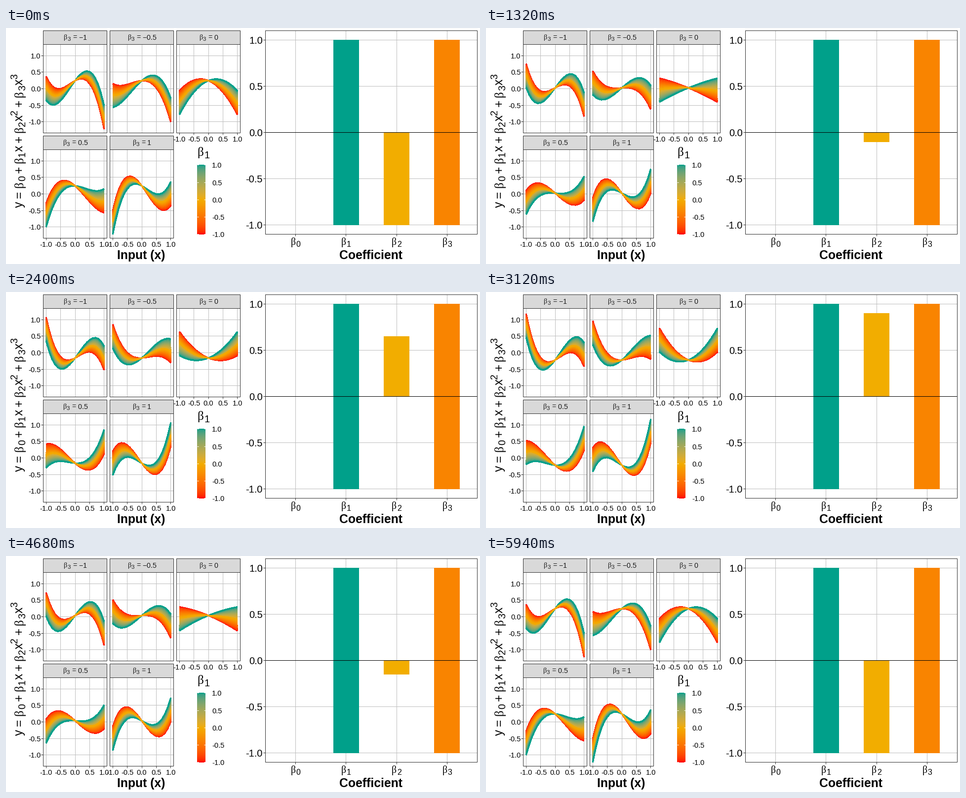
Animation of 960 by 480 pixels, one loop 6 s. Source, as a matplotlib script:

```python
import math
import numpy as np
import matplotlib.pyplot as plt
from matplotlib.animation import FuncAnimation
from matplotlib.collections import LineCollection
from matplotlib.colors import to_rgb
from matplotlib.patches import Rectangle

plt.rcParams["font.family"] = "Liberation Sans"

W, H, DPI = 960, 480, 96
PX = 72 / DPI  # points per pixel
TEAL, YELLOW, ORANGE, RED = "#00A08A", "#F2AD00", "#F98400", "#FF0000"
GRID, BORDER, STRIP = "#BEBEBE", "#333333", "#D9D9D9"
HALF, STEP = 50, 0.05  # frames per sweep, step between keyed beta_2 values

fig = plt.figure(figsize=(W / DPI, H / DPI), dpi=DPI, facecolor="white")
ax = fig.add_axes([0, 0, 1, 1])
ax.set_xlim(0, W)
ax.set_ylim(H, 0)
ax.axis("off")


def center(v):
    """Middle of the pixel that holds v."""
    return math.floor(v) + .5


def line(x0, y0, x1, y1, color=GRID, z=1):
    ax.plot([center(x0), center(x1)], [center(y0), center(y1)], color=color,
            lw=PX, zorder=z, solid_capstyle="butt", snap=False)


def frame(x0, y0, x1, y1, fill="none"):
    x0, y0, x1, y1 = map(center, (x0, y0, x1, y1))
    ax.add_patch(Rectangle((x0, y0), x1 - x0, y1 - y0, fc=fill, ec=BORDER,
                           lw=PX, zorder=4, snap=False, joinstyle="miter"))


def block(x0, y0, x1, y1, fill):
    patch = Rectangle((x0, y0), x1 - x0, y1 - y0, fc=fill, ec="none",
                      zorder=2, snap=False)
    return ax.add_patch(patch)


def label(x, y, text, size, ha="center", color="black", **kw):
    ax.text(x, y, text, size=size * PX, ha=ha, va="baseline", color=color,
            zorder=6, **kw)


# Font advances in em; digits and anything else use the default
ADVANCE = {"β": .549, "x": .5, "y": .5, "=": .584, "+": .584, "−": .584, ".": .278}
SPACE = {"=": .278, "+": .222}
SMALL = .8


def formula(x, y, text, size, align=.5, angle=0, color="black"):
    """Set a formula; '_' lowers and '^' raises the next character."""
    glyphs, pen, shift = [], 0, ""
    for ch in text:
        if ch in "_^":
            shift = ch
            continue
        scale = SMALL if shift else 1
        rise = {"_": -.2, "^": .45, "": 0}[shift]
        pen += SPACE.get(ch, 0)
        glyphs.append((ch, pen, rise, scale))
        pen += ADVANCE.get(ch, .556) * scale + SPACE.get(ch, 0)
        shift = ""
    c, s = math.cos(math.radians(angle)), math.sin(math.radians(angle))
    for ch, at, rise, scale in glyphs:
        dx, dy = (at - align * pen) * size, rise * size
        label(x + dx * c - dy * s, y - dx * s - dy * c, ch, size * scale, "left",
              color, rotation=angle, rotation_mode="anchor",
              family="Liberation Serif" if ch == "β" else "Liberation Sans")


# Colour scale: red, yellow, teal blended in CIE Lab
XYZ = np.array([[.4124, .3576, .1805], [.2126, .7152, .0722], [.0193, .1192, .9505]])


def blend(t):
    stops = np.array([to_rgb(c) for c in (RED, YELLOW, TEAL)])
    lin = np.where(stops > .04045, ((stops + .055) / 1.055) ** 2.4, stops / 12.92)
    lab = np.cbrt(lin @ XYZ.T)
    mix = np.stack([np.interp(t, [-1, 0, 1], c) for c in lab.T], axis=-1)
    rgb = np.clip(mix ** 3 @ np.linalg.inv(XYZ).T, 0, 1)
    return np.where(rgb > .0031308, 1.055 * rgb ** (1 / 2.4) - .055, 12.92 * rgb)


# Orthonormal polynomials on the 21 point grid
xs = np.linspace(-1, 1, 21)
s2, s4 = np.sum(xs ** 2), np.sum(xs ** 4)
P1, P2, P3 = [p / np.linalg.norm(p)
              for p in (xs, xs ** 2 - s2 / 21, xs ** 3 - s4 / s2 * xs)]

# Stacking order: 0 up to 1, then -1 up to 0
b1 = np.roll(np.linspace(-1, 1, 41), 21)
curve_colors = blend(b1)
UX, UY = 58.6, 67.3  # pixels per data unit in the small panels
TICKS = np.arange(-1, 1.01, .5)


def make_panel(k, b3):
    col, row = k % 3, k // 3
    x0, y0 = 75.5 + 135 * col, 5.5 + 214 * row
    x1, top, bottom = x0 + 129, y0 + 28, y0 + 208
    cx, cy = x0 + 64.5, y0 + 118
    frame(x0, y0, x1, top, STRIP)
    formula(cx, y0 + 18, f"β_3={b3:g}".replace("-", "−"), 14.3, color="#1A1A1A")
    for t in TICKS:
        gx, gy = cx + UX * t, cy - UY * t
        line(gx, top, gx, bottom)
        line(x0, gy, x1, gy)
        if col == 0:
            line(x0 - 4, gy, x0, gy, BORDER)
            label(x0 - 5, gy + 5.5, f"{t:.1f}", 14.67, "right")
        if row == 1 or col == 2:
            line(gx, bottom, gx, bottom + 4, BORDER)
            label(gx, bottom + 17.5, f"{t:.1f}", 14.67)
    frame(x0, top, x1, bottom)
    lines = LineCollection([], colors=curve_colors, linewidths=2 * PX,
                           antialiaseds=False, zorder=2)
    ax.add_collection(lines)
    return lines, b3, cx, cy


panels = [make_panel(k, b3) for k, b3 in enumerate(TICKS)]
formula(34, 229, "y=β_0+β_1x+β_2x^2+β_3x^3", 24.5, angle=90)
label(273.5, 470, "Input (x)", 24.8, weight="bold")

# Colour bar
formula(387.5, 260, "β_1", 25, align=0)
ax.imshow(blend(np.linspace(1, -1, 142))[:, None], extent=(387, 404, 420, 278),
          aspect="auto", interpolation="nearest", zorder=2)
for t in TICKS:
    y = 349.2 - 70.3 * t
    line(387, y, 390, y, "white", 3)
    line(401, y, 404, y, "white", 3)
    label(417, y + 5.5, f"{t:.1f}", 14.67, "left")

# Coefficient chart
LEFT, RIGHT, TOP, BOTTOM, ZERO, UNIT = 525.5, 954.5, 5.5, 419.5, 212.5, 188
for t in TICKS:
    y = ZERO - UNIT * t
    line(LEFT, y, RIGHT, y)
    line(LEFT - 4, y, LEFT, y, BORDER)
    label(520, y + 7.5, f"{t:.1f}", 20, "right")
for k in range(4):
    x = 586.6 + 102.2 * k
    line(x, TOP, x, BOTTOM)
    line(x, BOTTOM, x, BOTTOM + 4, BORDER)
    formula(x, 441, f"β_{k}", 20)
block(663, 24, 715, 401, TEAL)
block(867, 24, 919, 401, ORANGE)
bar = block(765, ZERO, 817, ZERO, YELLOW)
line(LEFT, ZERO, RIGHT, ZERO, "black", 3)
frame(LEFT, TOP, RIGHT, BOTTOM)
label(739, 470, "Coefficient", 24.8, weight="bold")

# Keyed values snap to whole frames and are tweened linearly in between
keys = np.arange(-1, 1 + STEP / 2, STEP)
key_frames = np.round((HALF - 1) * np.arange(len(keys)) / (len(keys) - 1))


def update(i):
    j = min(i, 2 * HALF - 1 - i)
    b2 = np.interp(j, key_frames, keys)
    tip = ZERO - UNIT * b2
    top, bottom = math.floor(min(tip, ZERO)), math.floor(max(tip, ZERO)) + 1
    bar.set_y(top)
    bar.set_height(bottom - top)
    for lines, b3, cx, cy in panels:
        ys = np.outer(b1, P1) + b2 * P2 + b3 * P3
        lines.set_segments([np.column_stack([cx + UX * xs, cy - UY * y]) for y in ys])
    return [bar] + [p[0] for p in panels]


anim = FuncAnimation(fig, update, frames=2 * HALF, interval=1000 * 6 // HALF // 2,
                     repeat=True, repeat_delay=0, blit=False)
plt.show()
```
